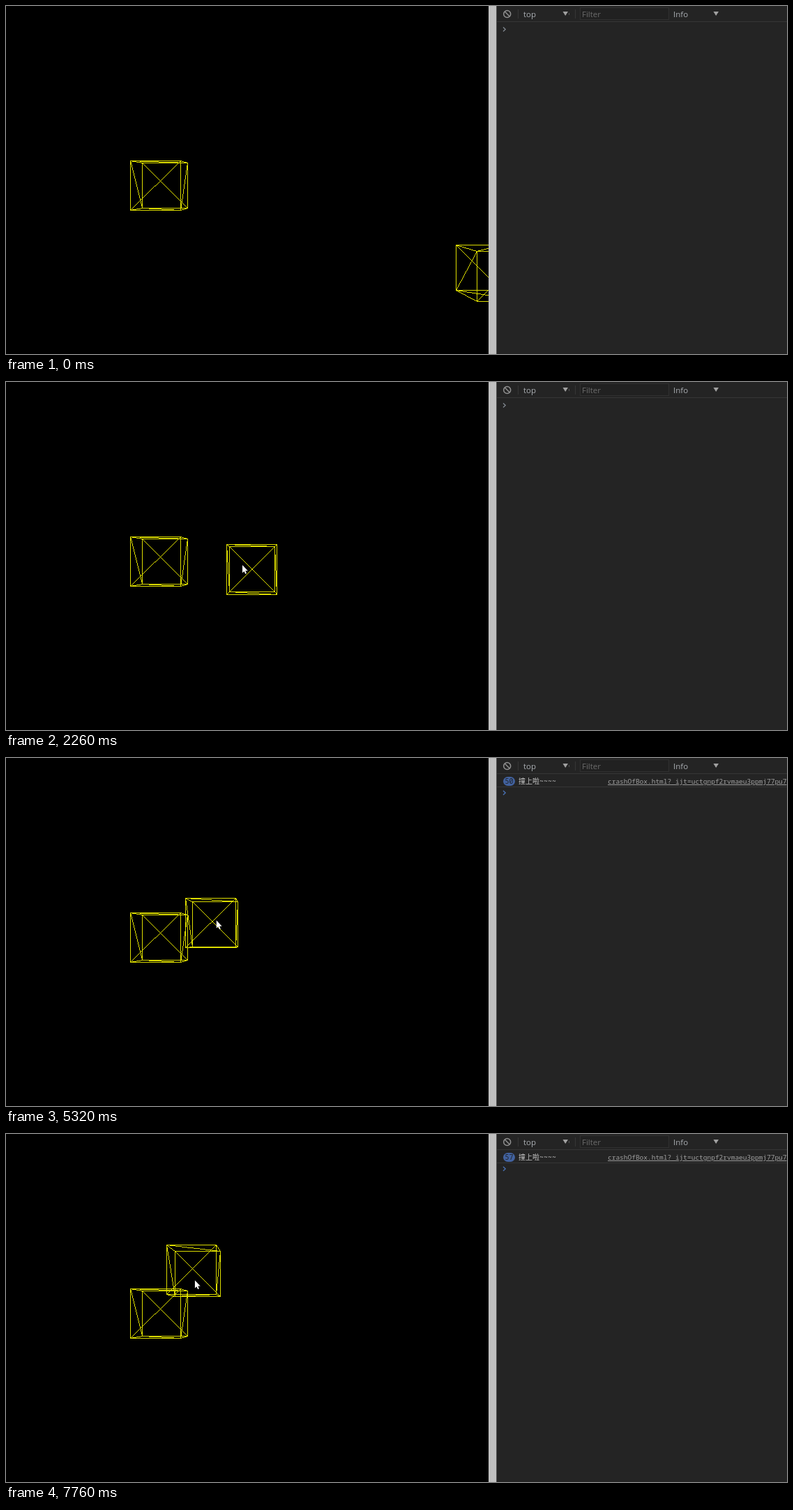
An HTML page with a canvas that plays this animation: 1120x500 px, repeating every 8 s.

```html
<!DOCTYPE html>
<html lang="en">
<head>
<meta charset="utf-8">
<title>Box collision</title>
<style>
  html, body { margin: 0; width: 100%; height: 100%; overflow: hidden; background: #000; }
  canvas, svg { position: absolute; left: 0; top: 0; display: block; }
  .ui { font: 11.5px "Open Sans", sans-serif; fill: #a9adb2; }
  .log { font: 10px "Noto Sans Mono", "Noto Sans CJK SC", "Noto Sans CJK", monospace; fill: #c8c8c8; }
  .line { stroke: #363636; }
</style>
</head>
<body>
<canvas id="view" width="692" height="500"></canvas>
<svg width="1120" height="500" viewBox="0 0 1120 500">
  <rect x="692" width="11" height="500" fill="#bfbfbf"/>
  <rect x="703" width="417" height="500" fill="#242424"/>
  <rect x="703" width="1" height="500" fill="#555"/>
  <path class="line" d="M704 22.5H1120M734.5 5V18M816.5 5V18"/>
  <g fill="none" stroke="#909090" stroke-width="1.5">
    <circle cx="718.7" cy="11.5" r="5"/>
    <path d="M715.2 8L722.2 15"/>
  </g>
  <rect x="823.5" y="2.5" width="127" height="17" fill="#212121" stroke="#303030"/>
  <path fill="#a0a0a0" d="M798.5 8H806L802.2 14ZM1014.5 8H1022L1018.2 14Z"/>
  <path stroke="#555" d="M807.5 10V13"/>
  <text class="ui" x="742" y="16">top</text>
  <text class="ui" x="826" y="16" style="fill:#6c6c6c">Filter</text>
  <text class="ui" x="957" y="16">Info</text>
  <g id="log">
    <rect id="badge" x="713" y="27" height="13" rx="6.5" fill="#42629f"/>
    <text class="log" id="count" y="37" text-anchor="middle" style="fill:#20242c"></text>
    <text class="log" id="message" y="37">撞上啦~~~~</text>
    <text class="log" x="863" y="37" text-decoration="underline" style="font-size:9.5px;fill:#a0a0a0">crashOfBox.html?_ijt=uctgnpf2rvmaeu3ppmj77pu7</text>
    <path class="line" d="M704 41.5H1120"/>
  </g>
  <path id="prompt" d="M713 30.5L716.2 33.5L713 36.5" fill="none" stroke-width="1.3"/>
  <path id="cursor" d="M0 0V11.2L2.5 9L4.2 12.8L6 12L4.3 8.3H7.8Z" fill="#fff"/>
</svg>
<script>
const $ = id => document.getElementById(id);
const ctx = $("view").getContext("2d");
const LOOP = 8000;
const LAG = 80;                          // the box trails the pointer
const HALF = 35.9;                       // half edge of the near face
const EYE = [357, 257], DEPTH = 0.0945;  // vanishing point, shrink of the far face
const START = [711.7, 388.5];            // box rests here until the pointer arrives

// Key points of the drag: time, box centre
const PATH = [
  [0, 1050, 550], [850, 495, 356], [1380, 416, 298], [1460, 415, 290],
  [1690, 391.7, 278.7], [2260, 352.5, 270], [2340, 341, 262], [2550, 324.5, 260.5],
  [3370, 299, 255], [4370, 284, 257.5], [5200, 284, 256], [5860, 336.5, 152],
  [6790, 276, 187], [7490, 264.5, 196.5], [7760, 266, 195]
];

function drag(t) {
  const i = PATH.findIndex(key => key[0] > t);
  if (i < 0) return PATH[PATH.length - 1].slice(1);
  const [t0, x0, y0] = PATH[i - 1], [t1, x1, y1] = PATH[i];
  const f = (t - t0) / (t1 - t0);
  return [x0 + (x1 - x0) * f, y0 + (y1 - y0) * f];
}

// One pixel wide line without smoothing
function line([x0, y0], [x1, y1]) {
  const dx = x1 - x0, dy = y1 - y0, n = Math.max(Math.abs(dx), Math.abs(dy), 1);
  for (let i = 0; i <= n; i++)
    ctx.fillRect(Math.round(x0 + dx * i / n), Math.round(y0 + dy * i / n), 1, 1);
}

// Wireframe box: near corners 0-3 and far corners 4-7, clockwise from top left
function box(x, y) {
  const near = [[-1, -1], [1, -1], [1, 1], [-1, 1]].map(([u, v]) => [x + u * HALF, y + v * HALF]);
  const far = near.map(p => p.map((v, k) => v + (EYE[k] - v) * DEPTH));
  const p = [...near, ...far].map(q => q.map(Math.floor));
  for (let i = 0; i < 4; i++) {
    const j = (i + 1) % 4;
    line(p[i], p[j]);
    line(p[i + 4], p[j + 4]);
    line(p[i], p[i + 4]);
  }
  for (const [a, b] of ["31", "46", "25", "70", "05", "72"]) line(p[a], p[b]);
}

function drawLog(hits) {
  const on = hits > 0, wide = hits > 9 ? 17 : 12;
  $("log").style.display = on ? "" : "none";
  $("badge").setAttribute("width", wide);
  $("count").setAttribute("x", 713 + wide / 2);
  $("count").textContent = hits;
  $("message").setAttribute("x", 718 + wide);
  $("prompt").setAttribute("transform", `translate(0 ${on ? 16.5 : 0})`);
  $("prompt").setAttribute("stroke", on ? "#4a74b8" : "#808890");
}

function draw(t) {
  const [x, y] = drag(t).map((v, k) => Math.min(v, START[k]));
  const [px, py] = drag(t + LAG);
  ctx.fillStyle = "#000";
  ctx.fillRect(0, 0, 692, 500);
  ctx.fillStyle = "#dd0";
  box(214.5, 258);
  box(x, y);
  $("cursor").setAttribute("transform", `translate(${(px + 32) / 1.1} ${(py + 72) / 1.27})`);
  $("cursor").style.display = t < 70 ? "none" : "";
  drawLog(Math.min(57, 15 + Math.floor((t - 4370) / 27)));
}

const start = performance.now();
function tick() {
  draw((performance.now() - start) % LOOP);
  requestAnimationFrame(tick);
}
tick();
</script>
</body>
</html>
```
